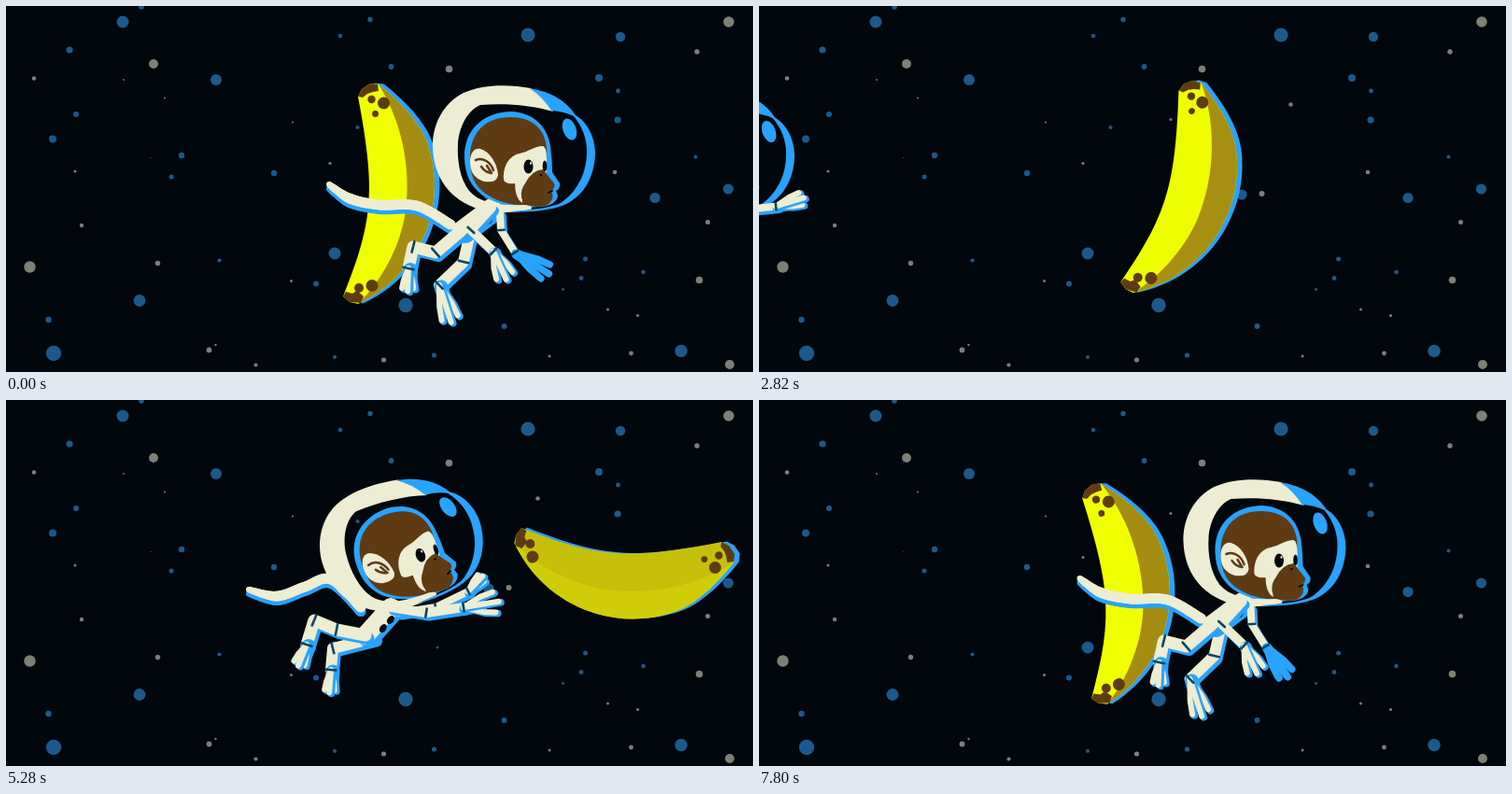
Write an HTML page with a canvas that moves like this. It is 800 by 392 pixels and loops after 7860 ms.

```html
<!DOCTYPE html>
<html lang="en">
<head>
<meta charset="utf-8">
<title>Space monkey and banana</title>
<style>
html, body { margin: 0; width: 100%; height: 100%; overflow: hidden; background: #02060d; }
canvas { display: block; }
</style>
</head>
<body>
<canvas id="stage" width="800" height="392"></canvas>
<script>
const g = document.getElementById('stage').getContext('2d');
const LOOP = 7860, STEP = 60;
const BLACK = '#02060d', CREAM = '#ecedd2', BLUE = '#28a3ff', BROWN = '#5f3b14', BAND = '#0b4564';

// x, y, radius
const blueStars = [
  145,1,2.8, 125,17,6.5, 68,47,3.6, 225,79,6, 75,116,3, 50,142.5,4, 188,160,3.2, 177,183,2.5,
  287,179,3.2, 390,14.5,2.7, 358,32,2.3, 412.5,65,2.9, 376.5,130,2.1, 352,265,6.5, 332,297.5,3,
  228.5,272.5,2.1, 143,315.5,6.4, 45.5,336,3.2, 51,372,8.2, 428,320.5,7.7, 352,376,2.1,
  458.5,374,2.6, 533.5,343,2.9, 596.5,303.5,1.5, 616,291.5,2.4, 620.5,271,2.5, 682.5,285,2.3,
  723,369.5,6.8, 695,205.5,5.6, 773.5,196,5.6, 738.5,161.5,2, 655,122,3.6, 655.5,91,2.4,
  635,77,4, 658,33,5.2, 559,31,7.6, 517,202,5.6, 462,265,1.4];
const greyStars = [
  774,17,5.8, 740,49,2.7, 158,62,5, 30,77.5,2.3, 126,79,.9, 170,98.5,1, 307,124.5,1, 155,162.5,.5,
  74,177,1.5, 347,168.5,1.6, 81,235,2.2, 25.5,279.5,6.2, 162.5,275.5,2.7, 305.5,294.5,1.5,
  217.5,368.5,2.9, 224.5,363,1.2, 267.5,384.5,2.1, 404.5,379,2.6, 474.5,67.5,3.8, 569.5,105.5,2.3,
  441,121.5,1.5, 538.5,201,3, 652,178,2.3, 751.5,231.5,2.5, 742.5,293.5,3.8, 644.5,325,1.5,
  676.5,331.5,1.6, 669.5,372,2.4, 582,375,1.5, 775,384,5];

// time, x, y, degrees
const bananaKeys = [
  [0, 414.5, 200, 0], [1620, 442.5, 200, 7], [3720, 479.4, 198.6, 16.8], [4680, 496.6, 196.8, 21],
  [4800, 498.7, 196.5, 21.5], [5280, 663.5, 190, 89.7], [5940, 900, 200, 155.5],
  [5940, -107, 241, 155.5], [6720, 103.7, 225.2, 233.3], [7800, 395.8, 203.1, 353.1],
  [LOOP, 414.5, 200, 360]];
const headKeys = [
  [0, 544, 152, 0], [1620, 915, 170, 0], [2500, 1120, 175, 0], [2500, -118, 155, 0],
  [3720, 145.5, 153, 0], [4680, 332, 146, -10], [4920, 375, 148, -14], [5280, 423, 152, -18],
  [6720, 496.5, 152, -3], [7800, 541.5, 152, 0], [LOOP, 544, 152, 0]];

// Joint positions relative to the helmet centre
const float = {
  tail: [-198,39, -176,54, -144,61, -104,62, -68,82],
  torso: [-24,64, -56,88],
  legA: [-84,112, -108,106, -113,129, -114,156],
  legB: [-54,122, -80,147, -66,191],
  armA: [-46,88, -22,111, -7,144],
  armB: [-14,88, 1,112, 39,136]
};
const reach = {
  tail: [-185,36, -141,45, -105,48, -76,57, -51,75],
  torso: [-23,65, -54,85],
  legA: [-83,93, -95,69, -108,79, -141,92],
  legB: [-67,109, -105,129, -133,162],
  armA: [-33,97, -41,137, -23,177],
  armB: [30,64, 67,60, 100,50]
};
const lunge = {
  tail: [-167,48, -134,61, -100,53, -70,58, -47,86],
  torso: [-14,68, -42,97],
  legA: [-27,110, -60,116, -86,96, -116,97],
  legB: [-49,86, -70,76, -94,64],
  armA: [-38,60, -32,90, -4,118],
  armB: [38,71, 56,48, 63,16]
};
const grab = {
  tail: [-163,51, -133,58, -103,48, -75,40, -43,70],
  torso: [-11,70, -38,100],
  legA: [-69,94, -93,84, -101,110, -111,135],
  legB: [-73,114, -75,137, -77,164],
  armA: [27,76, 67,70, 109,63],
  armB: [37,70, 72,53, 89,35]
};
const drift = {
  tail: [-190,34, -166,51, -131,57, -91,62, -64,81],
  torso: [-18,65, -51,90],
  legA: [-82,103, -105,97, -110,121, -119,149],
  legB: [-47,124, -84,141, -69,186],
  armA: [9,81, 49,65, 92,60],
  armB: [19,73, 52,60, 90,68]
};
const away = { ...float, tail: grab.tail };
const hang = { ...float, armB: [-14,88, 1,112, 25,147] };
const poseKeys = [[0, float], [1620, away], [2500, reach], [3720, reach], [4680, lunge],
  [5280, grab], [6720, drift], [7800, hang], [LOOP, float]];

const shape = d => new Path2D(d);
const banana = {
  body: shape('M377 97L381 89L390 83L399 84C428 107 447 130 453 152C461 178 461 205 453 232C443 266 418 300 377 319L368 317L361 311C372 283 385 250 388 215C391 185 387 150 377 97Z'),
  side: shape('M399 84C428 107 447 130 453 152C461 178 461 205 453 232C443 266 418 300 377 319C397 300 420 265 427 225C434 185 428 130 399 84Z'),
  ends: shape('M377 97L381 89L390 83L398 84L399 91L393 92L387 94L382 98ZM361 311L364 306L371 308L376 305L383 311L380 318L368 317Z')
};
const spots = [[391.5,100,4.2], [404.5,104,6.5], [395.5,115.5,3.4], [378,302,5], [392,299.5,6.5]];
const head = {
  shell: shape('M562 88C540 84 512 83 490 93C468 104 456 128 457 152C458 182 474 208 508 218C530 223 548 221 562 218Q566 214 555 213C530 214 508 212 496 198C486 185 483 165 484 148C485 130 494 112 508 106C535 104 562 106 586 113Q575 97 562 88Z'),
  rim: shape('M560 88C585 92 600 102 610 117C622 124 631 140 631 158C630 190 612 212 585 217Q560 222 540 220C575 217 590 215 598 208C613 196 622 178 622 156Q622 135 608 118Q598 113 584 112Q574 96 560 88Z'),
  outline: shape('M491 163C490 132 512 114 540 113C566 114 580 130 583 150Q585 165 585 178L593 190Q594 195 589 198L591 203Q590 212 575 215L556 216C520 214 492 200 491 163Z'),
  fur: shape('M497 160C498 134 515 119 540 119C562 119 577 130 579 152C578 175 575 200 570 214C540 215 515 208 503 190Q496 178 497 160Z'),
  face: shape('M533 186C532 170 540 160 550 158C560 156 566 150 575 150C580 152 579 165 579 178L565 182Q552 192 553 211Q545 206 545 190Q534 191 533 186Z'),
  muzzle: shape('M556 190Q563 176 575 175L587 190Q589 194 584 198Q589 207 578 214C565 217 554 213 552 205Q551 196 556 190Z'),
  ear: shape('M497 165C498 156 502 152 508 153C518 156 526 168 527 181Q526 190 512 188Q496 183 497 165Z'),
  earFold: shape('M503 165C511 162 519 167 522 176M509 172Q513 178 520 179L515 171'),
  mouth: shape('M562 194C570 200 580 200 588 198L585 208C575 210 566 204 562 194Z'),
  tongue: shape('M573 197Q580 200 590 198L585 210Q575 207 573 197Z')
};

const mix = (a, b, k) => a + (b - a) * k;

function segment(keys, t) {
  let i = keys.length - 2;
  while (i && keys[i][0] > t) i--;
  const a = keys[i], b = keys[i + 1];
  return [a, b, (t - a[0]) / (b[0] - a[0])];
}

function valuesAt(keys, t) {
  const [a, b, k] = segment(keys, t);
  return a.slice(1).map((v, i) => mix(v, b[i + 1], k));
}

function poseAt(t) {
  const [a, b, k] = segment(poseKeys, t), pose = {};
  for (const part in a[1]) {
    const v = a[1][part].map((n, i) => mix(n, b[1][part][i], k));
    pose[part] = [];
    for (let i = 0; i < v.length; i += 2) pose[part].push([v[i], v[i + 1]]);
  }
  return pose;
}

function fill(path, color) {
  g.fillStyle = color;
  g.fill(path);
}

function oval(x, y, rx, ry, color, turn = 0) {
  g.fillStyle = color;
  g.beginPath();
  g.ellipse(x, y, rx, ry, turn, 0, 7);
  g.fill();
}

function line(points, width, color, dx = 0, dy = 0) {
  g.strokeStyle = color;
  g.lineWidth = width;
  g.beginPath();
  for (const [x, y] of points) g.lineTo(x + dx, y + dy);
  g.stroke();
}

function drawStars(list, color) {
  for (let i = 0; i < list.length; i += 3) oval(list[i], list[i + 1], list[i + 2], list[i + 2], color);
}

function drawBanana(t) {
  const [x, y, deg] = valuesAt(bananaKeys, t), turn = deg * Math.PI / 180;
  const light = .5 + .5 * Math.cos(turn + .12);
  const tone = k => `rgb(${mix(165, 240, k)},${mix(141, 255, k)},${mix(17, 0, k)})`;
  const place = (dx, dy) => {
    g.save();
    g.translate(x + dx, y + dy);
    g.rotate(turn);
    g.translate(-414.5, -200);
  };
  place(5.5, -.5);
  fill(banana.body, BLUE);
  g.restore();
  place(0, 0);
  fill(banana.body, tone(light));
  fill(banana.side, tone(1 - light));
  fill(banana.ends, BROWN);
  for (const [sx, sy, r] of spots) oval(sx, sy, r, r, BROWN);
  g.restore();
}

function drawTail(p) {
  const spline = (a, b, c, d, u) =>
    .5 * (2 * b + (c - a) * u + (2 * a - 5 * b + 4 * c - d) * u * u + (3 * b - a - 3 * c + d) * u ** 3);
  for (const [color, dy] of [[BLUE, 4.5], [CREAM, 0]]) {
    for (let n = 0; n <= 80; n++) {
      const s = n / 20, i = Math.min(3, Math.floor(s));
      const q = [-1, 0, 1, 2].map(k => p[Math.max(0, Math.min(4, i + k))]);
      const [x, y] = [0, 1].map(c => spline(q[0][c], q[1][c], q[2][c], q[3][c], s - i));
      const r = Math.min(5.5, 3 + s * 2.5);
      oval(x, y + dy, r, r, color);
    }
  }
}

// Segmented limb; its last point is the tip of the middle finger or toe
function drawLimb(points, width, spread, color = CREAM) {
  const bones = points.slice(0, -1), end = bones[bones.length - 1], tip = points[points.length - 1];
  line(bones, width, BLUE, 3, 3.5);
  line(bones, width, CREAM);
  const aim = Math.atan2(tip[1] - end[1], tip[0] - end[0]);
  const size = Math.hypot(tip[0] - end[0], tip[1] - end[1]);
  const along = (a, d) => [end[0] + Math.cos(a) * d, end[1] + Math.sin(a) * d];
  line([end, along(aim, size * .4)], width + 3, BLUE, 2, 2);
  for (const side of [-1, 1, 0]) {
    const a = aim + side * spread;
    const toe = [end, along(a, size * .5), along(aim + side * spread * .8, size * (side ? .82 : .9))];
    line(toe, 7.5, BLUE, 2.2, 1.2);
    line(toe, 6, color);
  }
  for (let i = 1; i < bones.length; i++) {
    const [x, y] = bones[i], a = Math.atan2(y - bones[i - 1][1], x - bones[i - 1][0]) + Math.PI / 2;
    const dx = Math.cos(a) * width * .45, dy = Math.sin(a) * width * .45;
    line([[x - dx, y - dy], [x + dx, y + dy]], 2.6, BAND);
  }
}

function drawTorso([chest, hip]) {
  line([chest, hip], 22, BLUE, 4, 3);
  line([chest, hip], 20, CREAM);
  const dx = hip[0] - chest[0], dy = hip[1] - chest[1], len = Math.hypot(dx, dy);
  for (const k of [.25, .55]) {
    oval(chest[0] + dx * k + dy / len * 9, chest[1] + dy * k - dx / len * 9, 3.4, 5, BLACK, .6);
  }
}

function drawHead(deg, open) {
  g.save();
  g.rotate(deg * Math.PI / 180);
  g.translate(-544, -152);
  fill(head.outline, BLUE);
  fill(head.fur, BROWN);
  fill(head.face, CREAM);
  oval(559.5, 172, 5, 7.5, BLACK);
  oval(562, 168.5, 1, 1.4, CREAM);
  oval(577, 171.5, 2.3, 6, BLACK);
  fill(head.muzzle, BROWN);
  oval(573, 181, 1.5, 1, BLACK);
  if (open) {
    fill(head.tongue, BLUE);
    fill(head.mouth, BLACK);
    oval(581, 204, 4, 3.5, BLUE, -.5);
  } else {
    line([[581, 200], [585, 198]], 1.8, BLACK);
  }
  fill(head.ear, CREAM);
  g.strokeStyle = BROWN;
  g.lineWidth = 2.5;
  g.stroke(head.earFold);
  fill(head.shell, CREAM);
  fill(head.rim, BLUE);
  oval(603.5, 132, 7, 12, BLUE, -.35);
  g.restore();
}

function drawMonkey(t) {
  const [x, y, deg] = valuesAt(headKeys, t), pose = poseAt(t);
  const [chest, hip] = pose.torso, [, wrist, tip] = pose.armB;
  g.save();
  g.translate(x, y);
  drawTail(pose.tail);
  drawLimb([[hip[0] + 9, hip[1] + 3], ...pose.legB], 12, .3);
  drawTorso(pose.torso);
  drawLimb([hip, ...pose.legA], 13, .35);
  drawHead(deg, t > 2500 && t < 5040);
  drawLimb([[chest[0] + 9, chest[1] + 6], ...pose.armB], 8, .3, tip[1] - wrist[1] > 12 ? BLUE : CREAM);
  drawLimb([chest, ...pose.armA], 10, .4);
  g.restore();
}

const start = performance.now();
function draw() {
  const t = Math.floor((performance.now() - start) % LOOP / STEP) * STEP;
  g.fillStyle = BLACK;
  g.fillRect(0, 0, 800, 392);
  drawStars(blueStars, '#1b598c');
  drawStars(greyStars, '#7c8075');
  drawBanana(t);
  drawMonkey(t);
  requestAnimationFrame(draw);
}
g.lineCap = g.lineJoin = 'round';
draw();
</script>
</body>
</html>
```
